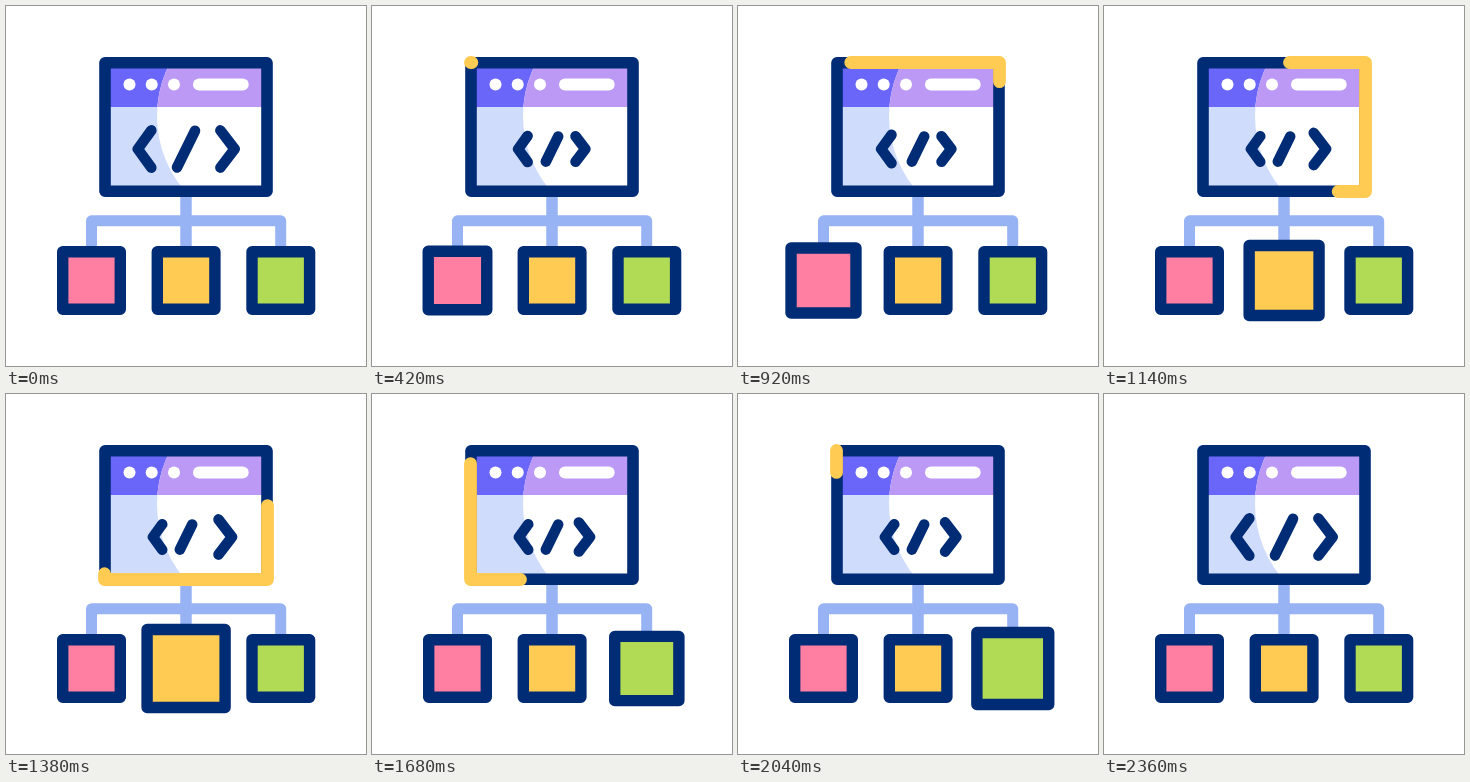
An HTML page with a canvas that plays this animation: 360x360 px, repeating every 2.4 s.

```html
<!DOCTYPE html>
<html lang="en">
<head>
<meta charset="utf-8">
<title>Code structure</title>
<style>
html, body { margin: 0; width: 100%; height: 100%; overflow: hidden; background: #fff; }
canvas { display: block; width: 360px; height: 360px; }
</style>
</head>
<body>
<canvas id="stage"></canvas>
<script>
const LOOP = 2400, STEP = 20;
const NAVY = '#002c76', YELLOW = '#ffcb52', LINK = '#98b3f4';
const canvas = document.getElementById('stage');
const ctx = canvas.getContext('2d');
const dpr = window.devicePixelRatio || 1;
canvas.width = canvas.height = 360 * dpr;

// Eased progress from time a to time b
const ease = (t, a, b) => {
  const p = Math.min(1, Math.max(0, (t - a) / (b - a)));
  return (1 - Math.cos(Math.PI * p)) / 2;
};
// Smooth bump of height 1 around a peak
const pulse = (t, peak, half) => ease(Math.abs(t - peak), half, 0);

function line(points, color, width, closed) {
  ctx.beginPath();
  points.forEach(([x, y]) => ctx.lineTo(x, y));
  if (closed) ctx.closePath();
  ctx.strokeStyle = color;
  ctx.lineWidth = width;
  ctx.stroke();
}

function box(x, y, w, h, color) {
  ctx.fillStyle = color;
  ctx.fillRect(x, y, w, h);
}

function links() {
  line([[180, 188], [180, 242]], LINK, 11.5);
  line([[85.5, 242], [85.5, 214.8], [274.7, 214.8], [274.7, 242]], LINK, 11);
}

function tile(x, color, grow) {
  const y = 274.5, r = 28.8 + 11.7 * grow;
  box(x - r, y - r, 2 * r, 2 * r, color);
  line([[x - r, y - r], [x + r, y - r], [x + r, y + r], [x - r, y + r]], NAVY, 11.4, true);
}

function browser() {
  box(99, 57, 162, 128, '#d0dcfb');
  box(99, 57, 162, 44, '#6b66fa');
  ctx.save();
  ctx.beginPath();
  ctx.arc(266, 110, 115, 0, 2 * Math.PI);
  ctx.clip();
  box(99, 57, 162, 128, '#fff');
  box(99, 57, 162, 44, '#bb99f5');
  ctx.restore();
  for (const x of [123.5, 145.7, 168]) line([[x, 78.5], [x + 0.01, 78.5]], '#fff', 12);
  line([[193, 78.5], [236.7, 78.5]], '#fff', 12);
  line([[99, 56.8], [261, 56.8], [261, 185.2], [99, 185.2]], NAVY, 11.6, true);
}

// Glyphs shrink towards the middle of the window
function glyph(points, size) {
  const s = 0.685 + 0.315 * size;
  line(points.map(([x, y]) => [180 + (x - 180) * s, 143 + (y - 143) * s]), NAVY, 10.6);
}

function glyphs(t) {
  const base = 1 - ease(t, 200, 400) + ease(t, 2160, 2360);
  const left = Math.max(base, pulse(t, 700, 330));
  const right = Math.max(base, pulse(t, 1290, 330), pulse(t, 1862, 290));
  glyph([[145.3, 124.4], [131.8, 143], [145.3, 161.6]], left);
  glyph([[189, 124.8], [171, 161.4]], base);
  glyph([[214.4, 124.4], [228.6, 143], [214.4, 161.6]], right);
}

function trail(t) {
  if (t <= 376 || t >= 2219) return;
  const x = 98.5, y = 56.5, w = 163, h = 129, total = 2 * (w + h);
  const head = total * ease(t, 376, 1818);
  const tail = total * ease(t, 776, 2219);
  ctx.save();
  ctx.setLineDash([Math.max(0.01, head - tail), total * 2]);
  ctx.lineDashOffset = -tail;
  line([[x, y], [x + w, y], [x + w, y + h], [x, y + h], [x, y]], YELLOW, 12.8);
  ctx.restore();
}

function draw(t) {
  ctx.setTransform(dpr, 0, 0, dpr, 0, 0);
  ctx.lineCap = ctx.lineJoin = 'round';
  box(0, 0, 360, 360, '#fff');
  links();
  browser();
  glyphs(t);
  trail(t);
  tile(85.5, '#ff7fa3', pulse(t, 712, 335));
  tile(180.1, YELLOW, pulse(t, 1302, 335));
  tile(274.8, '#b1db54', pulse(t, 1896, 335));
}

const start = performance.now();
function frame() {
  const t = (performance.now() - start) % LOOP;
  const now = Math.floor(t / STEP) * STEP;
  draw(now < 220 ? 0 : now);
  requestAnimationFrame(frame);
}
frame();
</script>
</body>
</html>
```
